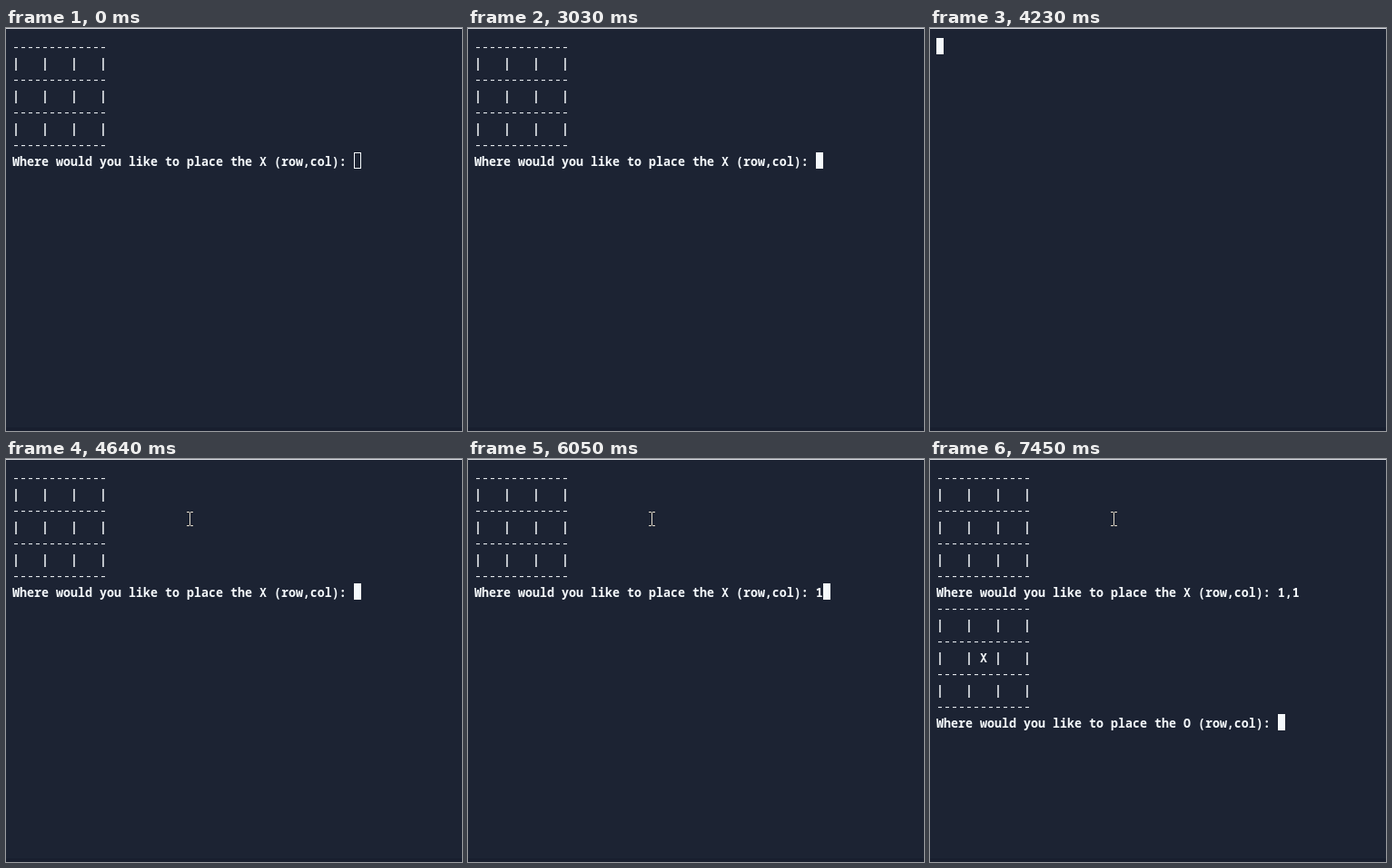
An HTML page for the animation above (8 s loop, 502 px wide and 444 px high).

```html
<!DOCTYPE html>
<html lang="en">
<head>
<meta charset="utf-8">
<title>Noughts and crosses in a terminal</title>
<style>
  html, body { margin: 0; width: 100%; height: 100%; overflow: hidden; background: #1c2333; }
  svg { display: block; width: 100%; height: 100%; }
  text { font: 600 13.3333px "Noto Sans Mono", "DejaVu Sans Mono", monospace; fill: #f5f9fc; white-space: pre; font-variant-ligatures: none; }
  .rule { font-weight: 400; }
</style>
</head>
<body>
<svg viewBox="0 0 502 444">
  <rect width="502" height="444" fill="#1c2333"/>
  <rect width="502" height="1" fill="#d9dce2"/>
  <rect y="440" width="502" height="4" fill="#181e2e"/>
  <g id="screen"></g>
  <rect id="caret" width="7" height="17" stroke="#f5f9fc"/>
  <circle id="click" cx="200" cy="65" r="12" fill="#ff0" fill-opacity=".47"/>
  <path id="pointer" d="M0 .5h3M4 .5h3M3.5 1v14M0 15.5h3M4 15.5h3" fill="none" stroke="#e3dccc"/>
</svg>
<script>
const LOOP = 8000, LEFT = 7, TOP = 11, CELL = 8, LINE = 18;
const byId = id => document.getElementById(id);
const screen = byId("screen"), caret = byId("caret"), click = byId("click"), pointer = byId("pointer");

const rule = "-".repeat(13);
const row = (a = " ", b = " ", c = " ") => `| ${a} | ${b} | ${c} |`;
const board = middle => [rule, row(), rule, middle, rule, row(), rule];
const ask = mark => `Where would you like to place the ${mark} (row,col): `;

const empty = board(row());
const waiting = typed => [...empty, ask("X") + typed];

// Terminal contents: start time, lines; the caret follows the last line
const output = [
  [0, waiting("")],
  [3430, [...empty, ""]],
  [4230, [""]],
  [4450, waiting("")],
  [6050, waiting("1")],
  [6650, waiting("1,")],
  [6850, waiting("1,1")],
  [7450, [...waiting("1,1"), ...board(row(" ", "X")), ask("O")]]
];

// Pointer: start time, left, top; hidden without a position
const moves = [
  [0], [200, 449, 329], [400, 419, 159], [600, 400, 116], [810, 393, 113],
  [1010, 438, 360], [1210], [2210, 424, 431], [2430, 103, 68], [2620, 31, 21],
  [2820], [4450, 106, 47], [4640, 199, 58]
];

const latest = (steps, t) => steps.findLast(step => step[0] <= t);
const show = (el, on) => el.setAttribute("visibility", on ? "visible" : "hidden");

function textLine(line, i) {
  const el = document.createElementNS("http://www.w3.org/2000/svg", "text");
  const lift = line === rule ? 1.5 : line[0] === "|" ? 0.5 : 0;
  el.setAttribute("x", LEFT);
  el.setAttribute("y", TOP + i * LINE + 15 - lift);
  if (line === rule) el.setAttribute("class", "rule");
  el.textContent = line;
  return el;
}

let shown;
function draw(t) {
  const lines = latest(output, t)[1];
  if (lines !== shown) {
    screen.replaceChildren(...lines.map(textLine));
    shown = lines;
  }
  const last = lines.length - 1;
  caret.setAttribute("x", LEFT + lines[last].length * CELL + 0.5);
  caret.setAttribute("y", TOP + last * LINE + 0.5);
  caret.setAttribute("fill", t < 3030 ? "none" : "#f5f9fc");

  const [, x, y] = latest(moves, t);
  show(pointer, x !== undefined);
  if (x !== undefined) pointer.setAttribute("transform", `translate(${x} ${y})`);
  show(click, t >= 4840 && t < 5040);
}

const start = performance.now();
function tick() {
  draw((performance.now() - start) % LOOP);
  requestAnimationFrame(tick);
}
tick();
</script>
</body>
</html>
```
